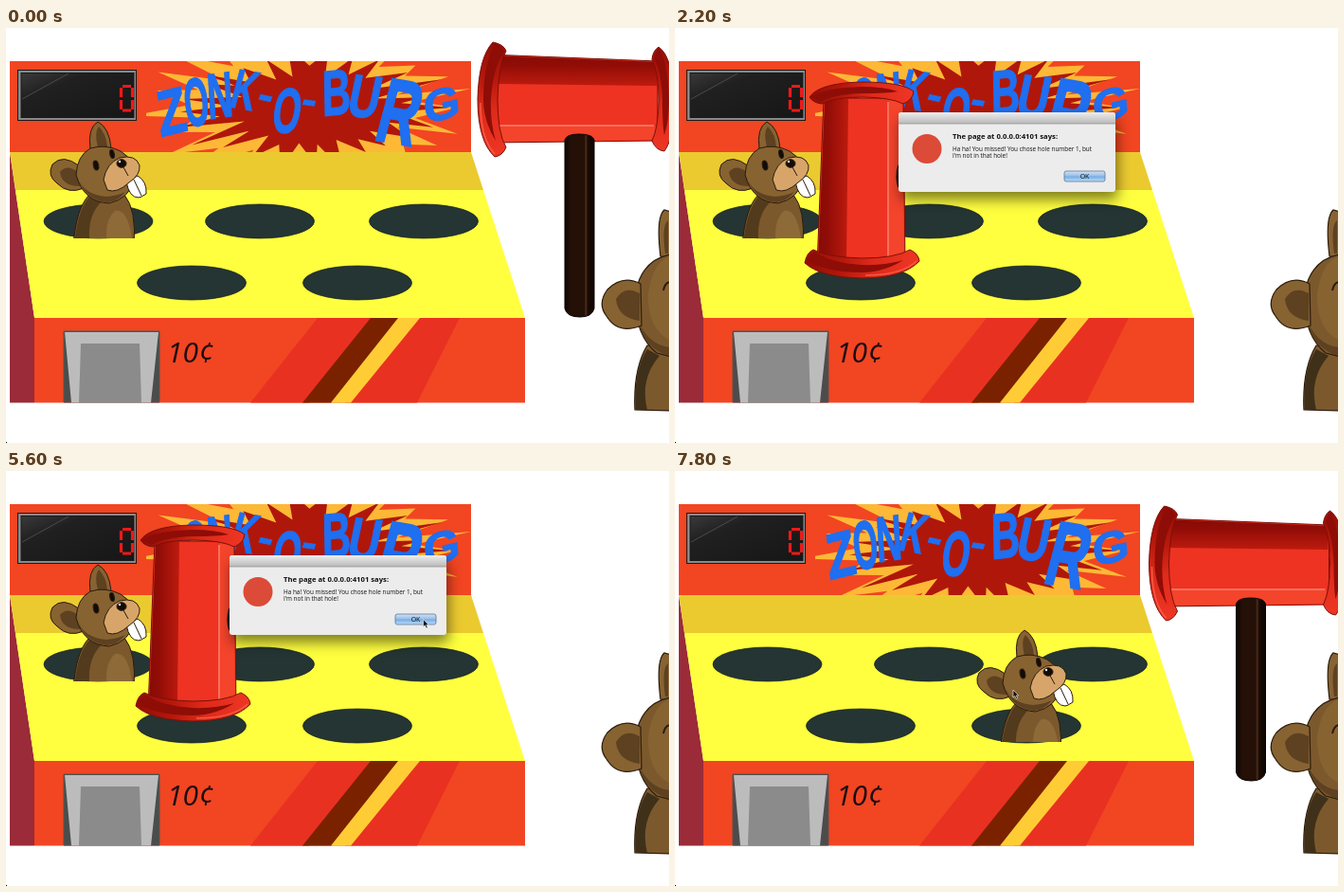
An HTML page for the animation above (8 s loop, 700 by 438 pixels).

```html
<!DOCTYPE html>
<html lang="en">
<head>
<meta charset="utf-8">
<title>Mole game</title>
<style>
html, body { margin: 0; width: 100%; height: 100%; overflow: hidden; background: #fff; }
svg { display: block; width: 700px; height: 438px; }
.ui { font-family: "Open Sans", "Noto Sans", sans-serif; fill: #111; }
#title { font: bold 42px "Liberation Sans", Arial, sans-serif; fill: #1f6ff0; stroke: #1f6ff0; text-anchor: middle; }
#price { font: italic 500 30px "Open Sans", sans-serif; fill: #1c0c10; }
#dialog { filter: drop-shadow(2px 8px 7px rgba(0, 0, 0, .5)); }
</style>
</head>
<body>
<svg viewBox="0 0 700 438">
  <defs>
    <clipPath id="panelClip"><path d="M148 35H491V131H148Z"/></clipPath>
    <clipPath id="moleClip"><path d="M0 0H300V222H0Z"/></clipPath>
    <clipPath id="dragClip"><path id="dragBox"/></clipPath>
    <linearGradient id="wood">
      <stop offset="0" stop-color="#0c0502"/><stop offset=".2" stop-color="#241006"/>
      <stop offset=".66" stop-color="#241006"/><stop offset=".72" stop-color="#4c2c1b"/>
      <stop offset=".78" stop-color="#1b0b04"/><stop offset="1" stop-color="#0c0502"/>
    </linearGradient>
    <linearGradient id="lip" x2="0" y2="1">
      <stop stop-color="#930d07"/><stop offset=".3" stop-color="#b3170b"/>
      <stop offset=".6" stop-color="#df2a1a"/><stop offset="1" stop-color="#ee3624"/>
    </linearGradient>
    <linearGradient id="shade" x2="0" y2="1">
      <stop stop-color="#860b06"/><stop offset=".35" stop-color="#930d07"/><stop offset="1" stop-color="#bd1b0e"/>
    </linearGradient>
    <linearGradient id="bar" x2="0" y2="1">
      <stop stop-color="#ededed"/><stop offset="1" stop-color="#b9b9b9"/>
    </linearGradient>
    <linearGradient id="button" x2="0" y2="1">
      <stop stop-color="#d3e3f5"/><stop offset=".48" stop-color="#96bde8"/>
      <stop offset=".52" stop-color="#76aae2"/><stop offset="1" stop-color="#b9e0fa"/>
    </linearGradient>
    <linearGradient id="screen" x2="1" y2="1">
      <stop stop-color="#3a3a3a"/><stop offset=".3" stop-color="#202020"/><stop offset="1" stop-color="#161616"/>
    </linearGradient>
  </defs>

  <g id="cabinet">
    <path fill="#f24522" d="M4 35H491V131H4ZM30 306H548V395.500H30Z"/>
    <path fill="#9b2b38" d="M4 131L30 306V395.500H4Z"/>
    <path fill="#ebca30" d="M4 131H491L504 171H10Z"/>
    <path fill="#ffff3f" d="M10 171H504L548 306H30Z"/>
    <path fill="#e93121" d="M329 306H390L320 395.500H258ZM430 306H479L434 395.500H358Z"/>
    <path fill="#7a2200" d="M385 306H415L344 395.500H313Z"/>
    <path fill="#ffcc35" d="M414 306H437L364 395.500H343Z"/>
    <path fill="#4c4c4c" d="M61 320H162V395.500H61Z"/>
    <path fill="#bcbcbc" d="M62 321H161L153 395.500H69Z"/>
    <path fill="#8b8b8b" d="M79 333H141L143 395.500H77Z"/>
    <path fill="none" stroke="#555" d="M61 395V320H162V395"/>
    <text id="price" x="170" y="353">10¢</text>
    <rect x="12.500" y="44.500" width="125" height="53" fill="#8a8a8a" stroke="#1a1a1a"/>
    <rect x="16" y="47.500" width="119" height="47" fill="url(#screen)" stroke="#1a1a1a"/>
    <path stroke="#4b4b4b" stroke-width="1" d="M17 75L66 48"/>
    <path fill="none" stroke="#f01818" stroke-width="3.200" d="M123 61.5H132M121.5 63V73M133.500 63V73M121.500 76V86M133.500 76V86M123 87H132"/>
    <g clip-path="url(#panelClip)"><path id="burst" fill="#fdb836"/><path id="core" fill="#b0170b"/></g>
    <g id="title"></g>
    <g id="holes" fill="#243533" stroke="#17201f" stroke-width=".7"></g>
  </g>

  <g id="den" clip-path="url(#moleClip)">
    <g id="mole" stroke="#2b1b0c" stroke-linejoin="round">
      <path fill="#7c592d" d="M71 230Q74 190 88 176H125Q138 192 135 230Z"/>
      <path fill="#523a1c" stroke="none" d="M72 230Q75 192 89 177L101 183Q84 200 89 230Z"/>
      <path fill="#8e6a39" stroke="none" d="M107 230Q103 203 115 193Q130 190 134 230Z"/>
      <path fill="#876332" d="M78 146Q60 132 49 144Q43 156 54 164Q66 176 82 169Z"/>
      <path fill="#5d4120" stroke="none" d="M76 152Q64 143 57 152Q59 167 78 167Z"/>
      <path fill="#876332" d="M89 128Q86 105 97 99Q109 105 111 127Z"/>
      <path fill="#5d4120" stroke="none" d="M97 126Q93 110 98 104Q106 112 107 126Z"/>
      <path fill="#876332" d="M74 155Q75 135 89 127Q105 122 121 130Q138 140 135 161Q130 180 109 185Q82 184 74 155Z"/>
      <path fill="#5d4120" stroke="none" d="M76 158Q82 176 106 178Q118 177 126 173Q117 184 107 184Q84 182 76 158Z"/>
      <path fill="#fff" d="M127 162L139 156Q149 162 148 175L143 178L140 179Q130 179 127 162Z"/>
      <path fill="none" d="M135 160L143 177"/>
      <path fill="#d7a56a" d="M103 160Q106 143 120 137Q137 133 141 145Q142 155 130 163Q117 175 107 171Z"/>
      <ellipse cx="122" cy="143" rx="5" ry="4.300" fill="#120c08"/>
      <circle cx="120" cy="141" r="1.200" fill="#fff" stroke="none"/>
      <path fill="none" d="M124 147L129 156"/>
      <ellipse cx="95" cy="145" rx="2.700" ry="5" fill="#120c08" transform="rotate(-12 95 145)"/>
      <ellipse cx="112" cy="133" rx="2.300" ry="4.500" fill="#120c08" transform="rotate(-12 112 133)"/>
    </g>
  </g>

  <g id="bigMole" stroke="#2b1b0c" stroke-width="1.200">
    <path fill="#876332" d="M691 241Q686 200 695 192L702 194V242Z"/>
    <path fill="#5d4120" stroke="none" d="M696 238Q692 208 699 203V238Z"/>
    <path fill="#7c592d" d="M664 403Q662 360 677 335H702V404Z"/>
    <path fill="#3f301a" stroke="none" d="M665 403Q662 362 677 339L690 346Q669 370 677 403Z"/>
    <path fill="#7c592d" d="M702 239Q672 244 665 278Q662 323 687 343L702 347Z"/>
    <path fill="#876332" stroke="none" d="M702 241Q683 246 678 280Q677 318 702 330Z"/>
    <path fill="#5d4120" stroke="none" d="M666 305Q676 334 701 337V346Q674 340 666 305Z"/>
    <path fill="#876332" d="M670 270Q651 260 635 276Q624 291 634 304Q646 324 671 314Z"/>
    <path fill="#5d4120" stroke="none" d="M669 280Q653 271 644 286Q646 306 669 309Z"/>
    <path fill="none" stroke-width="2" d="M694 277Q696 268 702 268"/>
  </g>

  <g id="ghost" fill="#fff8c8" fill-opacity=".55">
    <path stroke="#b9ad68" stroke-width=".6" d="M322 130H379V142H322Z"/>
    <path d="M330 122H376L379 131H326Z"/>
  </g>

  <g clip-path="url(#dragClip)">
    <g id="hammer" stroke-linejoin="round">
      <path fill="#ee3322" stroke="#7d0f08" d="M-92 -47L86 -40V44L-92 46Z"/>
      <path fill="url(#shade)" d="M-90 -46L85 -39V-14L-84 -16Z"/>
      <path fill="#f4442b" d="M-86 29H84V43L-88 45Z"/>
      <path stroke="#fa8472" stroke-width="1.500" d="M-84 28H82"/>
      <path fill="url(#lip)" stroke="#7d0f08" d="M-88 -60Q-77 -58 -74 -51Q-82 -36 -83 0Q-83 36 -74 51Q-78 60 -86 61Q-104 44 -104 0Q-103 -44 -88 -60Z"/>
      <path fill="#8e0d07" d="M-86 -58Q-79 -56 -76 -50Q-88 -33 -90 0Q-91 24 -85 44Q-98 23 -98 0Q-98 -36 -86 -58Z"/>
      <path fill="none" stroke="#f65a43" stroke-width="1.500" d="M-101 4Q-101 42 -86 58"/>
      <path fill="url(#lip)" stroke="#7d0f08" d="M87 -55Q102 -45 103 0Q103 43 93 55Q84 54 80 44Q87 30 87 0Q87 -28 80 -42Q81 -51 87 -55Z"/>
      <path fill="#8e0d07" d="M87 -53Q97 -39 98 0Q98 24 93 38Q91 27 91 0Q90 -30 82 -43Z"/>
      <path fill="url(#wood)" stroke="#090301" d="M-12 43Q-10 37 3 37Q17 37 19 43V221Q17 230 4 230Q-10 230 -12 221Z"/>
    </g>
  </g>

  <g id="dialog">
    <rect x="236" y="89" width="229" height="84" rx="3" fill="#ececec"/>
    <path fill="url(#bar)" d="M236 101V92Q236 89 239 89H462Q465 89 465 92V101Z"/>
    <path stroke="#8b8b8b" stroke-width=".7" d="M236 101H465"/>
    <circle cx="266" cy="127.500" r="15.500" fill="#dc4a38"/>
    <g class="ui" font-size="6.400">
      <text x="293" y="117" font-size="7.700" font-weight="700">The page at 0.0.0.0:4101 says:</text>
      <text x="293" y="129.500">Ha ha! You missed! You chose hole number 1, but</text>
      <text x="293" y="137">I'm not in that hole!</text>
      <rect x="411" y="151" width="43" height="11" rx="2" fill="url(#button)" stroke="#5d7595" stroke-width=".8"/>
      <text x="432.500" y="159.200" font-size="7" text-anchor="middle">OK</text>
    </g>
  </g>

  <path id="cursor" fill="#111" stroke="#fff" stroke-width=".6" d="M0 0V8L1.800 6.400L3.200 9.500L4.700 8.800L3.300 5.900H5.700Z"/>
  <path fill="#000" d="M0 437H1V438H0Z"/>
</svg>
<script>
const LOOP = 8000, STEP = 200;
const $ = id => document.getElementById(id);
const make = (parent, tag, attrs, text = "") => {
  const el = document.createElementNS("http://www.w3.org/2000/svg", tag);
  for (const k in attrs) el.setAttribute(k, attrs[k]);
  el.textContent = text;
  parent.append(el);
};
const place = (id, x, y, more = "") => $(id).setAttribute("transform", `translate(${x} ${y}) ${more}`);
const show = (id, on) => $(id).setAttribute("visibility", on ? "visible" : "hidden");

// Piecewise linear track of [time, ...values]
const track = (keys, t) => {
  let i = 0;
  while (i < keys.length - 2 && t > keys[i + 1][0]) i++;
  const [a, b] = [keys[i], keys[i + 1]];
  const p = Math.max(0, Math.min(1, (t - a[0]) / (b[0] - a[0])));
  return a.slice(1).map((v, k) => v + (b[k + 1] - v) * p);
};

// Spiky star with seeded uneven rays
const star = (rx, ry, dip, seed) => {
  const rand = () => (seed = seed * 16807 % 2147483647) / 2147483647;
  const n = 50;
  let d = "";
  for (let i = 0; i < n; i++) {
    const a = (i + rand() * 0.8) / n * Math.PI * 2;
    const r = i % 2 ? dip + rand() * 0.2 : 0.8 + rand() * 0.3;
    d += `${i ? "L" : "M"}${(320 + Math.cos(a) * rx * r).toFixed(1)} ${(84 + Math.sin(a) * ry * r).toFixed(1)}`;
  }
  return d + "Z";
};
$("burst").setAttribute("d", star(172, 88, 0.55, 71));
$("core").setAttribute("d", star(144, 64, 0.5, 409));

// letter, x, y, turn, width, height
[
  ["Z", 175, 89, -14, 1.2, 1.6], ["O", 201, 79, -10, 0.8, 1.7], ["N", 226, 72, -8, 0.9, 1.6],
  ["K", 252, 66, 10, 0.85, 1.4], ["-", 275, 71, 12, 1.1, 1], ["O", 297, 88, 4, 0.9, 1.6],
  ["-", 321, 76, 8, 1.1, 1], ["B", 349, 69, -6, 1, 1.6], ["U", 379, 73, 6, 1.1, 1.5],
  ["R", 416, 90, 10, 1.4, 2.3], ["G", 460, 81, -14, 1.2, 1.1]
].forEach(([ch, x, y, turn, w, h]) => make($("title"), "text",
  { transform: `translate(${x} ${y}) rotate(${turn}) scale(${w} ${h}) skewX(-8)`, y: 14 }, ch));

[[97.5, 204], [268, 204], [441, 204], [196, 269], [371, 269]].forEach(([cx, cy]) =>
  make($("holes"), "ellipse", { cx, cy, rx: 57.5, ry: 18 }));

const drag = [[0, 602, 75], [200, 580, 70], [400, 480, 70], [600, 365, 73], [800, 282, 75]];
const sink = [[6200, 0], [6600, 70], [7000, 130]];
const rise = [[7000, 125], [7600, 16], [7800, 5]];
const pointer = [[3000, 300, 372], [3400, 188, 327], [3600, 188, 327], [4600, 441, 157],
  [6800, 440, 156], [7200, 420, 180], [7800, 357, 231]];

function render(time) {
  const t = Math.floor(time % LOOP / STEP) * STEP;
  const laid = t >= 1000 && t < 7000;
  const dragged = t >= 400 && t < 1000;

  if (laid) place("hammer", 197, 160, "rotate(-90)");
  else place("hammer", ...(t < 1000 ? track(drag, t) : [604.5, 97]));
  $("dragBox").setAttribute("d", `M0 0H700V${dragged ? 285 : 438}H0Z`);
  show("ghost", t === 800);

  const moved = t >= 7000;
  place("den", moved ? 272 : 0, moved ? 64 : 0);
  place("mole", 0, track(moved ? rise : sink, t)[0]);

  show("dialog", t >= 1200 && t < 6000);
  show("cursor", t >= 3000);
  place("cursor", ...track(pointer, t));
}

const start = performance.now();
const tick = () => {
  render(performance.now() - start);
  requestAnimationFrame(tick);
};
tick();
</script>
</body>
</html>
```
